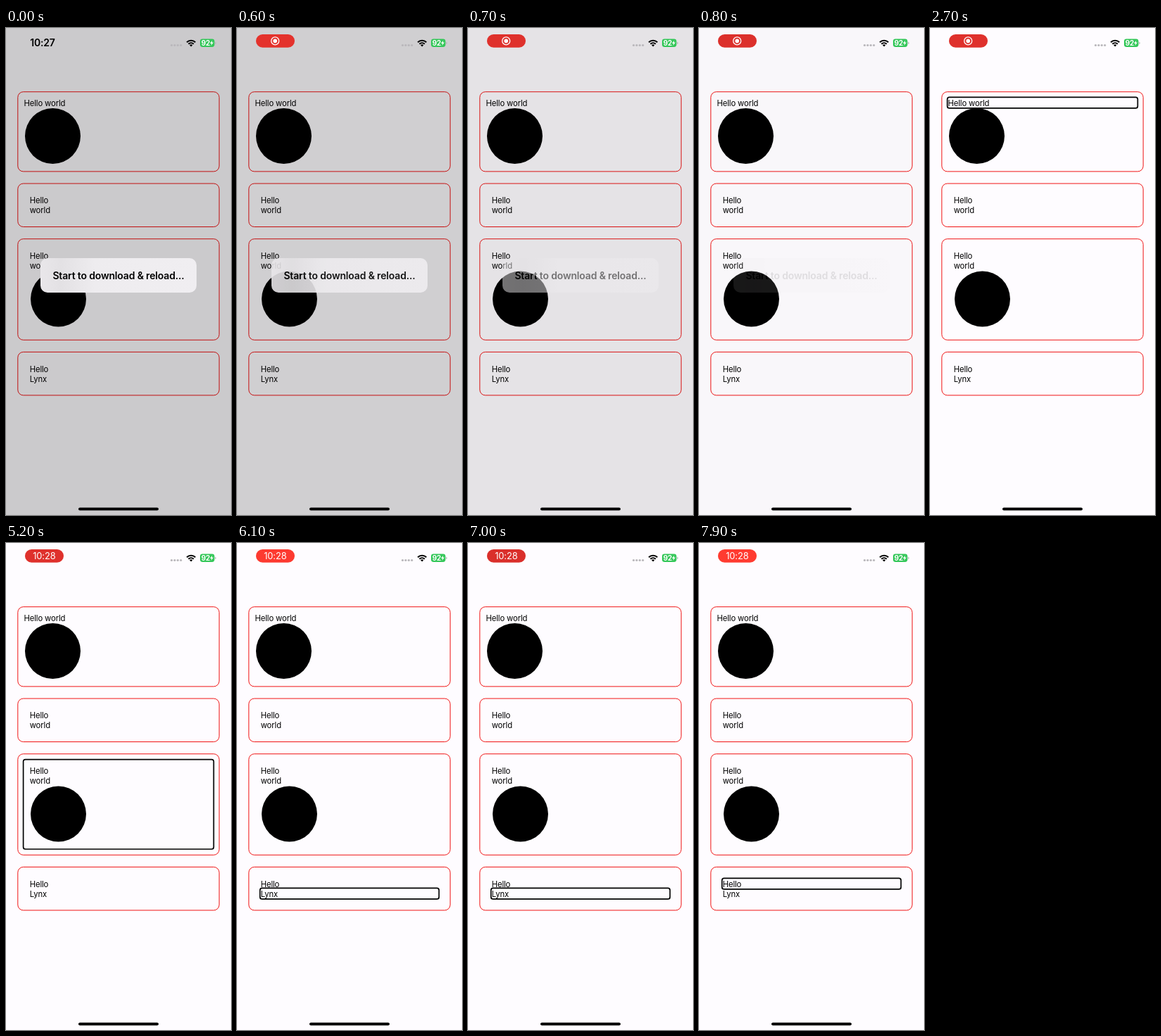
An HTML page that plays this animation: 320x692 px, repeating every 8 s.

```html
<!DOCTYPE html>
<html lang="en">
<head>
<meta charset="utf-8">
<title>Focus order</title>
<style>
  html, body { margin: 0; width: 100%; height: 100%; overflow: hidden; background: #fefcff; }
  svg { display: block; width: 100vw; height: 100vh; }
  text { font-family: Inter, "Liberation Sans", sans-serif; }
  .label { font-size: 11.3px; letter-spacing: -.13px; }
  .card { fill: none; stroke: #f00808; stroke-width: .95; }
</style>
</head>
<body>
<svg viewBox="0 0 320 692">
  <defs>
    <linearGradient id="frost" x1="0" y1="0" x2="1" y2="0">
      <stop offset="0" stop-color="#e9e7ea"/>
      <stop offset=".13" stop-color="#e3e1e4"/>
      <stop offset=".35" stop-color="#eeecef"/>
      <stop offset="1" stop-color="#f0eef1"/>
    </linearGradient>
  </defs>
  <rect width="320" height="692" fill="#fefcff"/>
  <g id="cards"></g>
  <rect id="focus" rx="3" fill="none" stroke="#000" stroke-width="1.7"/>
  <rect id="dim" width="320" height="692"/>
  <g id="toast">
    <rect x="49" y="327" width="222" height="49" rx="10" fill="url(#frost)"/>
    <text x="160" y="356.5" font-size="14" font-weight="600" letter-spacing="-.17" text-anchor="middle">Start to download &amp; reload...</text>
  </g>
  <text id="clock" x="52" y="26.3" font-size="14" font-weight="600" letter-spacing="-.2" text-anchor="middle">10:27</text>
  <g id="pill">
    <rect id="pillBack" x="27" y="9" width="55" height="18.8" rx="9.4"/>
    <g id="record">
      <circle cx="54.2" cy="18.4" r="5.5" fill="none" stroke="#fff" stroke-width="1.3"/>
      <circle cx="54.2" cy="18.4" r="2.8" fill="#fff"/>
    </g>
    <text id="pillTime" x="54.4" y="23" font-size="12.9" letter-spacing="-.1" text-anchor="middle" fill="#fff">10:28</text>
  </g>
  <g fill="#b9b7bb">
    <circle cx="235.5" cy="24.5" r="1.6"/><circle cx="239.9" cy="24.5" r="1.6"/>
    <circle cx="244.3" cy="24.5" r="1.6"/><circle cx="248.7" cy="24.5" r="1.6"/>
  </g>
  <g fill="none" stroke="#000" stroke-width="2.1">
    <path d="M257.1 20.2a8.7 8.7 0 0 1 12.2 0"/>
    <path d="M259.5 22.7a5.3 5.3 0 0 1 7.4 0"/>
    <path d="M261.1 24.2L263.2 26.4L265.3 24.2A3 3 0 0 0 261.1 24.2Z" fill="#000" stroke="none"/>
  </g>
  <rect x="276" y="15.5" width="20.5" height="11.5" rx="3.4" fill="#34c759"/>
  <path d="M297.3 19.4q1.4 .5 1.4 1.9t-1.4 1.9z" fill="#b5b3b6"/>
  <text x="277.8" y="25" font-size="10" font-weight="700" letter-spacing="-.3" fill="#fff">92</text>
  <path d="M293.4 17.4L290 21.9H292.2L291.4 25.2L295 20.6H292.7Z" fill="#fff"/>
  <rect x="103" y="681.5" width="114" height="4.1" rx="2.05"/>
</svg>
<script>
const LOOP = 8000;
const $ = id => document.getElementById(id);

function add(parent, tag, attrs, text) {
  const el = document.createElementNS('http://www.w3.org/2000/svg', tag);
  for (const key in attrs) el.setAttribute(key, attrs[key]);
  if (text) el.textContent = text;
  parent.appendChild(el);
}

const card = (y, height) =>
  add($('cards'), 'rect', { class: 'card', x: 16.8, y, width: 286.4, height, rx: 7.8 });
const label = (x, y, text) => add($('cards'), 'text', { class: 'label', x, y }, text);
const badge = (cx, cy) => add($('cards'), 'circle', { cx, cy, r: 39.5 });

card(90.7, 113.2);
label(25.5, 110.6, 'Hello world');
badge(66.5, 153.5);
card(221, 61.5);
label(33.7, 249.2, 'Hello');
label(33.7, 263.2, 'world');
card(299.7, 143.6);
label(33.7, 328, 'Hello');
label(33.7, 342, 'world');
badge(74.5, 385);
card(460.4, 61.5);
label(33.7, 488.5, 'Hello');
label(33.7, 502.5, 'Lynx');

// start time, x, y, width, height
const stops = [
  [1700, 24.6, 98.3, 270.8, 15.6],
  [3100, 24.6, 229, 270.8, 45.5],
  [4500, 24.6, 307.6, 270.8, 127.4],
  [5900, 32.7, 490.3, 254.6, 15.6],
  [7300, 32.7, 476.3, 254.6, 15.6]
];

const clamp = v => Math.min(1, Math.max(0, v));
const ramp = (t, from, to) => {
  const p = clamp((t - from) / (to - from));
  return p * p * p * (p * (6 * p - 15) + 10);
};
const mix = (a, b, p) => Math.round(a + (b - a) * p);

function draw(t) {
  const shown = 1 - ramp(t, 500, 900);
  $('dim').setAttribute('opacity', 0.2 * shown);
  $('toast').setAttribute('opacity', shown);

  const recording = ramp(t, 200, 500);
  $('clock').setAttribute('opacity', 1 - recording);
  $('pill').setAttribute('opacity', recording);
  const pulse = 0.5 + 0.5 * Math.cos((t - 1950) / 1000 * Math.PI);
  $('pillBack').setAttribute('fill',
    `rgb(${mix(218, 255, pulse)},${mix(47, 59, pulse)},${mix(43, 48, pulse)})`);

  const swap = ramp(t, 3700, 4000);
  $('record').setAttribute('opacity', 1 - swap);
  $('pillTime').setAttribute('opacity', swap);

  const stop = stops.filter(s => s[0] <= t).pop();
  $('focus').setAttribute('visibility', stop ? 'visible' : 'hidden');
  if (stop) ['x', 'y', 'width', 'height'].forEach((key, i) => $('focus').setAttribute(key, stop[i + 1]));
}

function tick() {
  draw(performance.now() % LOOP);
  requestAnimationFrame(tick);
}
tick();
</script>
</body>
</html>
```
